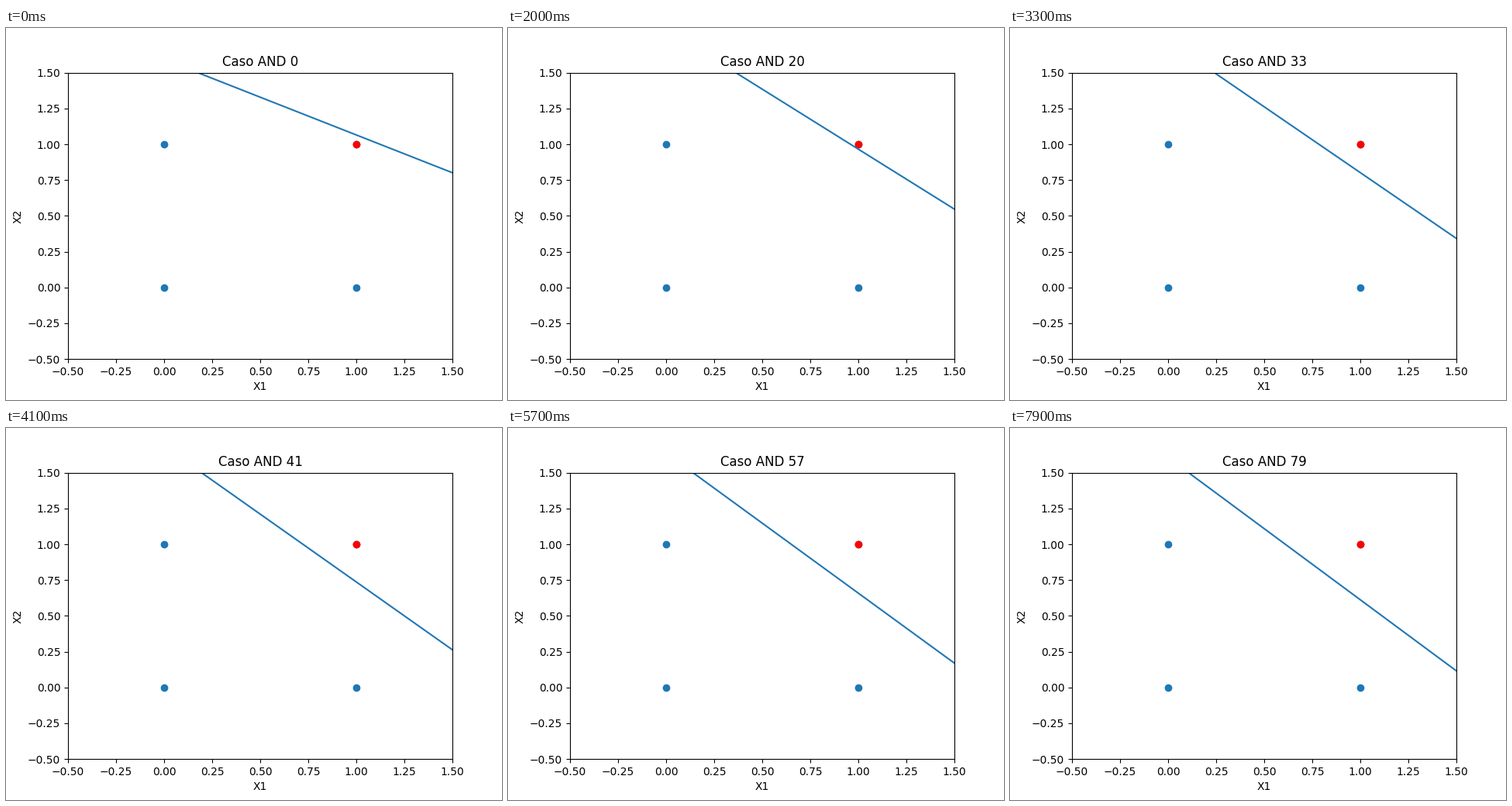
Recreate the animation shown at these times as a matplotlib script. Size 640 by 480 pixels, loop 8000 ms.

```python
import numpy as np
import matplotlib.pyplot as plt
from matplotlib.animation import FuncAnimation

FRAMES, INTERVAL = 80, 100


def decay(start, rate, t):
    return start * np.exp(-rate * t)


def boundary(epoch, x):
    """Decision line: it settles towards slope -1 as training goes on."""
    slope = 1 - decay(.4725, .0535, epoch)
    # x1 + x2 at the diagonal: a quick push outwards, then a slow return
    crossing = 1.586 + decay(.947, .046, epoch) - decay(.448, .332, epoch)
    return crossing * (1 + slope) / 2 - slope * x


fig, ax = plt.subplots(figsize=(6.4, 4.8), dpi=100)
ax.set(xlim=(-.5, 1.5), ylim=(-.5, 1.5), xlabel="X1", ylabel="X2")
ax.scatter([0, 0, 1, 1], [0, 1, 0, 1], color="C0")
ax.scatter([1], [1], color="red")
xs = np.array([-2.0, 3.0])
line, = ax.plot(xs, boundary(0, xs), color="C0", scalex=False, scaley=False)
title = ax.set_title("Caso AND 0")


def update(epoch):
    line.set_ydata(boundary(epoch, xs))
    title.set_text(f"Caso AND {epoch}")
    return line, title


anim = FuncAnimation(fig, update, frames=FRAMES, interval=INTERVAL,
                     repeat=True, repeat_delay=0, blit=False)
plt.show()
```
